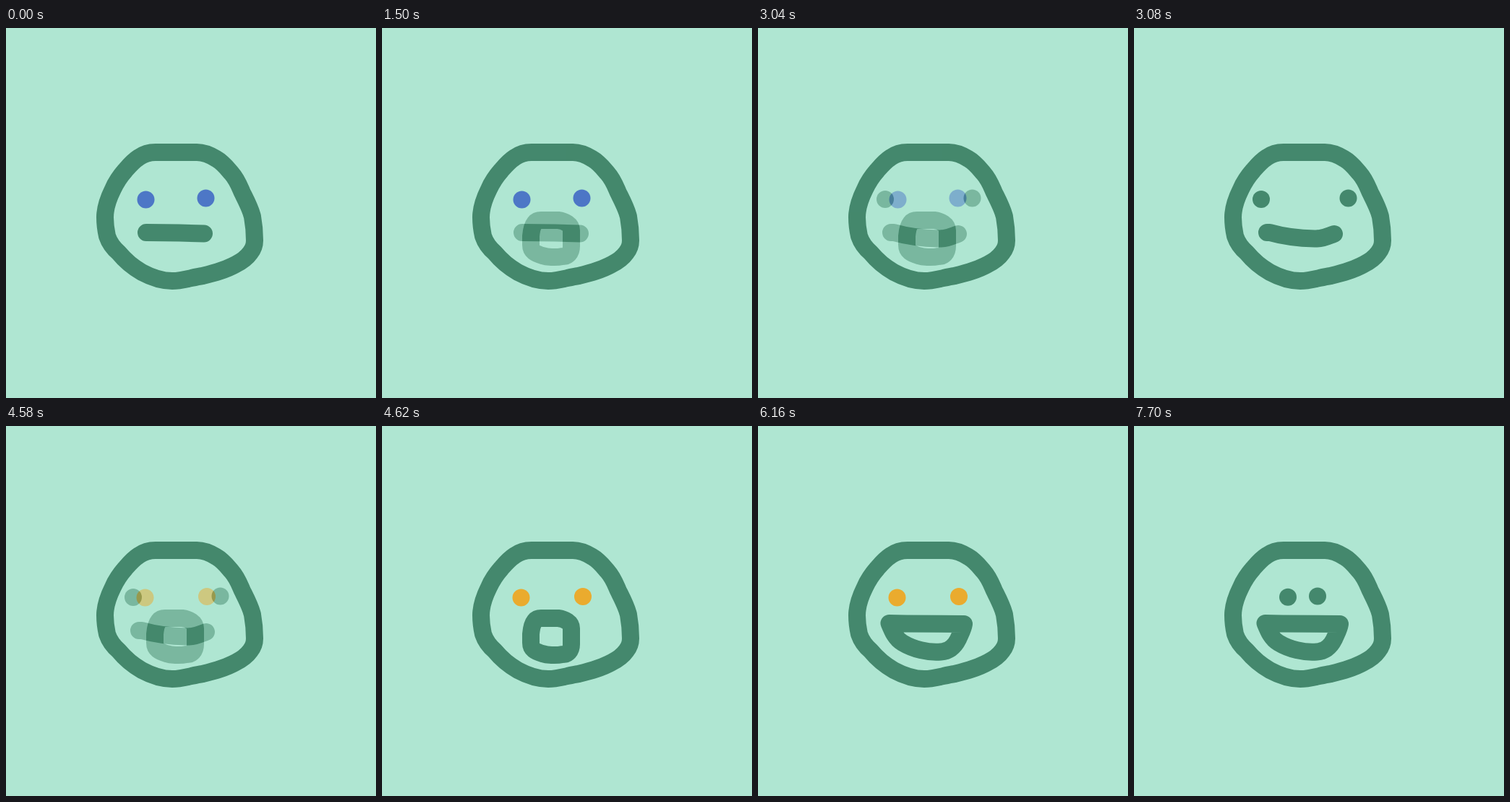
Write an HTML page that moves like this. It is 512 px wide and 512 px high and loops after 8000 ms.

```html
<!DOCTYPE html>
<html lang="en">
<head>
<meta charset="utf-8">
<title>Changing face</title>
<style>
  :root { --mint: #afe6d2; --green: #44886d; --blue: #4d77c6; --gold: #eaab2e; }
  html, body { margin: 0; width: 100%; height: 100%; overflow: hidden; background: var(--mint); }
  svg { display: block; width: 100%; height: 100%; }
  .line { fill: none; stroke: var(--green); stroke-width: 24; stroke-linecap: round; stroke-linejoin: round; }
  .bg { fill: var(--mint); }
  .green { fill: var(--green); }
  .blue { fill: var(--blue); }
  .gold { fill: var(--gold); }

  /* Each scene covers the one below: half blended for 40 ms, then solid. */
  .scene { opacity: 0; animation: 8s step-end infinite; }
  #gasp { animation-name: gasp; }
  #smile { animation-name: smile; }
  #gasp-gold { animation-name: gasp-gold; }
  #grin-gold { animation-name: grin-gold; }
  #grin { animation-name: grin; }
  @keyframes gasp { 0% { opacity: 0 } 18.75% { opacity: .5 } 19.25%, 100% { opacity: 1 } }
  @keyframes smile { 0% { opacity: 0 } 38% { opacity: .5 } 38.5%, 100% { opacity: 1 } }
  @keyframes gasp-gold { 0% { opacity: 0 } 57.25% { opacity: .5 } 57.75%, 100% { opacity: 1 } }
  @keyframes grin-gold { 0% { opacity: 0 } 76.5% { opacity: .5 } 77%, 100% { opacity: 1 } }
  @keyframes grin { 0% { opacity: 0 } 95.75% { opacity: .5 } 96.25%, 100% { opacity: 1 } }
</style>
</head>
<body>
<svg viewBox="0 0 512 512">
  <defs>
    <g id="head">
      <rect class="bg" width="512" height="512"/>
      <path class="line" d="M207 172H264C274 172 283 176 291 181C300 186 306 194 312 201
        C320 210 323 219 327 228C332 238 338 249 341 261C343 272 344 283 344 294
        C344 300 342 306 338 311C333 318 326 323 318 327C304 335 288 339 272 343
        C258 345 244 350 230 350C215 350 201 345 188 338C176 331 165 322 156 311
        C149 305 143 297 140 288C138 279 137 270 137 262C137 248 142 235 148 223
        C152 214 158 205 165 197C171 190 176 184 184 179C191 174 199 172 207 172Z"/>
    </g>
    <path id="flat-mouth" class="line" d="M194 283L240 283.5L274 284.5"/>
    <path id="round-mouth" class="line" d="M220 266H244C253 267 262 272 262 280V302
      C262 311 257 316 250 316C240 318 228 317 222 315C212 312 206 309 206 300V288
      C207 276 210 266 220 266Z"/>
    <path id="curved-mouth" class="line" d="M184 283H188C202 287 225 291 250 291.5C263 292 270 287 277 285"/>
    <path id="open-mouth" class="line" d="M181.5 273L205 273.5L285 274C284 281 280 288 277 295
      C272 305 264 312 253 312.5C235 314 215 309 200 300C190 294 186 284 181.5 273Z"/>
    <g id="blue-eyes" class="blue">
      <circle cx="193.5" cy="237.5" r="12"/><circle cx="276.5" cy="235.5" r="12"/>
    </g>
    <g id="gold-eyes" class="gold">
      <circle cx="192.5" cy="237.5" r="12"/><circle cx="278" cy="236" r="12"/>
    </g>
    <g id="wide-eyes" class="green">
      <circle cx="176" cy="237" r="12"/><circle cx="296.5" cy="235.5" r="12"/>
    </g>
    <g id="close-eyes" class="green">
      <circle cx="213" cy="236.8" r="12"/><circle cx="254" cy="235.5" r="12"/>
    </g>
  </defs>

  <g>
    <use href="#head"/><use href="#blue-eyes"/><use href="#flat-mouth"/>
  </g>
  <g id="gasp" class="scene">
    <use href="#head"/><use href="#blue-eyes"/><use href="#round-mouth"/>
  </g>
  <g id="smile" class="scene">
    <use href="#head"/><use href="#wide-eyes"/><use href="#curved-mouth"/>
  </g>
  <g id="gasp-gold" class="scene">
    <use href="#head"/><use href="#gold-eyes"/><use href="#round-mouth"/>
  </g>
  <g id="grin-gold" class="scene">
    <use href="#head"/><use href="#gold-eyes"/><use href="#open-mouth"/>
  </g>
  <g id="grin" class="scene">
    <use href="#head"/><use href="#close-eyes"/><use href="#open-mouth"/>
  </g>
</svg>
</body>
</html>
```
